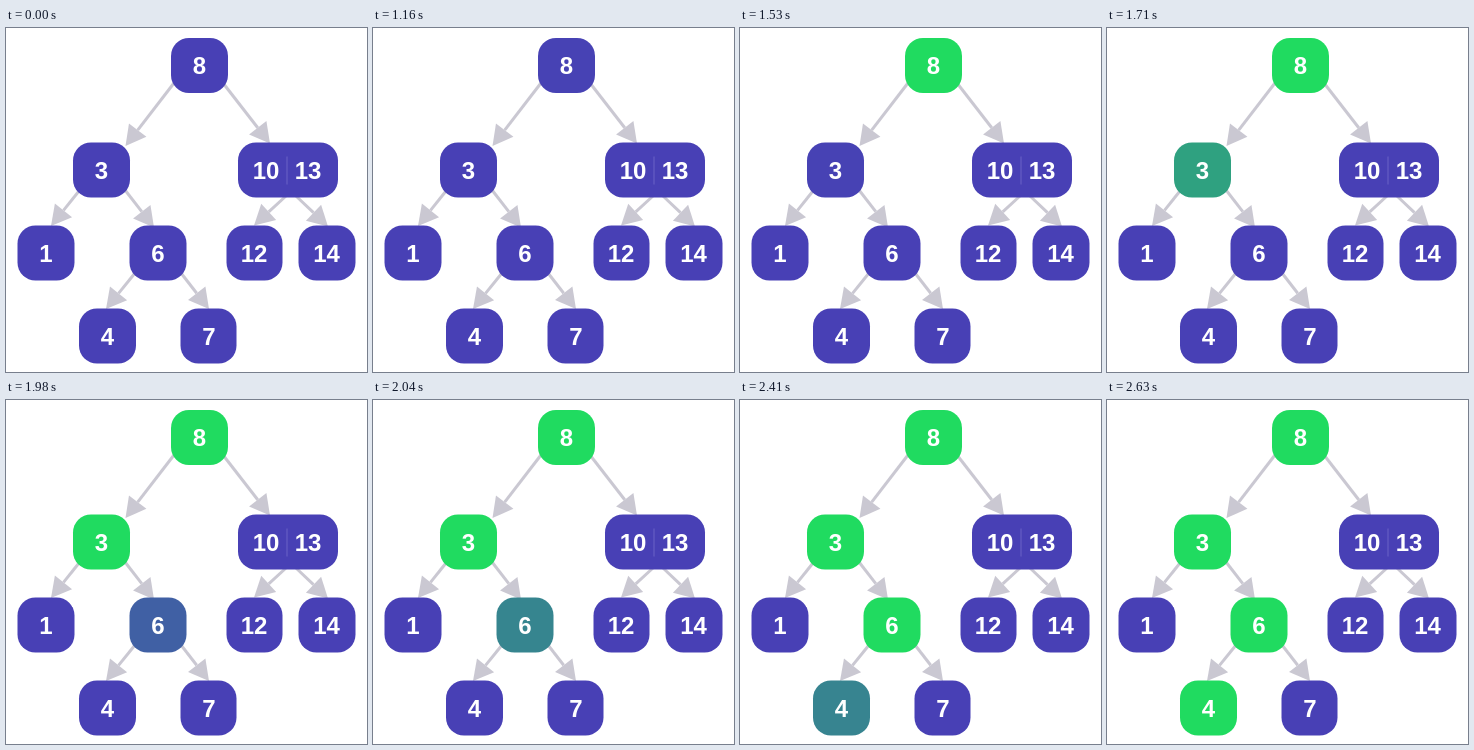
Animation of 361x344 px, one loop 5690 ms. Source, as an HTML page:

```html
<!DOCTYPE html>
<html lang="en">
<head>
<meta charset="utf-8">
<title>Tree search</title>
<style>
  html, body { margin: 0; width: 100%; height: 100%; overflow: hidden; background: #fff; }
  svg { display: block; width: 361px; height: 344px; }
  text {
    font: bold 24px "Liberation Sans", Arial, sans-serif;
    fill: #fff;
    text-anchor: middle;
  }
</style>
</head>
<body>
<svg id="stage" viewBox="0 0 361 344"></svg>
<script>
const LOOP = 5690, FADE = 348;
const BLUE = [72, 64, 181], GREEN = [32, 219, 96], GREY = '#cac8d2';
const stage = document.getElementById('stage');

// x, y, width, labels [text, centre x], fade start
const nodes = [
  [165, 10, 57, [['8', 193.5]], 1136],
  [67, 114.5, 57, [['3', 95.5]], 1508],
  [232, 114.5, 100, [['10', 260], ['13', 302]]],
  [11.5, 197.5, 57, [['1', 40]]],
  [123.5, 197.5, 57, [['6', 152]], 1880],
  [220.5, 197.5, 56, [['12', 248]]],
  [292.5, 197.5, 57, [['14', 320.5]]],
  [73, 280.5, 57, [['4', 101.5]], 2252],
  [174.5, 280.5, 56, [['7', 203]]]
];

// tail x, y, tip x, y
const arrows = [
  [168, 55, 119.5, 118], [217, 55, 264, 115.5],
  [73, 163, 45, 198], [119, 162, 148, 199.5],
  [280, 168, 248, 197.5], [290, 168, 322, 198.5],
  [129, 245, 100, 281], [175, 245, 203, 281]
];

function add(tag, attrs, content = '') {
  const el = document.createElementNS('http://www.w3.org/2000/svg', tag);
  for (const key in attrs) el.setAttribute(key, attrs[key]);
  el.textContent = content;
  return stage.appendChild(el);
}

function drawArrow([x1, y1, x2, y2]) {
  const len = Math.hypot(x2 - x1, y2 - y1);
  const ux = (x2 - x1) / len, uy = (y2 - y1) / len;
  const bx = x2 - ux * 20, by = y2 - uy * 20;
  const wx = -uy * 11, wy = ux * 11;
  add('line', { x1, y1, x2: bx, y2: by, stroke: GREY, 'stroke-width': 3 });
  add('path', {
    d: `M${x2} ${y2}L${bx + wx} ${by + wy}L${bx - wx} ${by - wy}Z`,
    fill: GREY
  });
}

function drawNode([x, y, width, labels, start]) {
  const box = add('rect', { x, y, width, height: 55, rx: 18, fill: `rgb(${BLUE})` });
  for (const [label, cx] of labels) add('text', { x: cx, y: y + 36 }, label);
  if (labels.length > 1) {
    add('line', { x1: 281, y1: y + 14, x2: 281, y2: y + 42, stroke: '#6b63c6' });
  }
  return { box, start };
}

arrows.forEach(drawArrow);
const fades = nodes.map(drawNode).filter(n => n.start);

function frame(now) {
  const t = now % LOOP;
  for (const { box, start } of fades) {
    const p = Math.min(1, Math.max(0, (t - start) / FADE));
    const k = p * p * (3 - 2 * p);
    const mix = BLUE.map((c, i) => Math.round(c + (GREEN[i] - c) * k));
    box.setAttribute('fill', `rgb(${mix})`);
  }
}

const began = performance.now();
function tick() {
  frame(performance.now() - began);
  requestAnimationFrame(tick);
}
tick();
</script>
</body>
</html>
```
